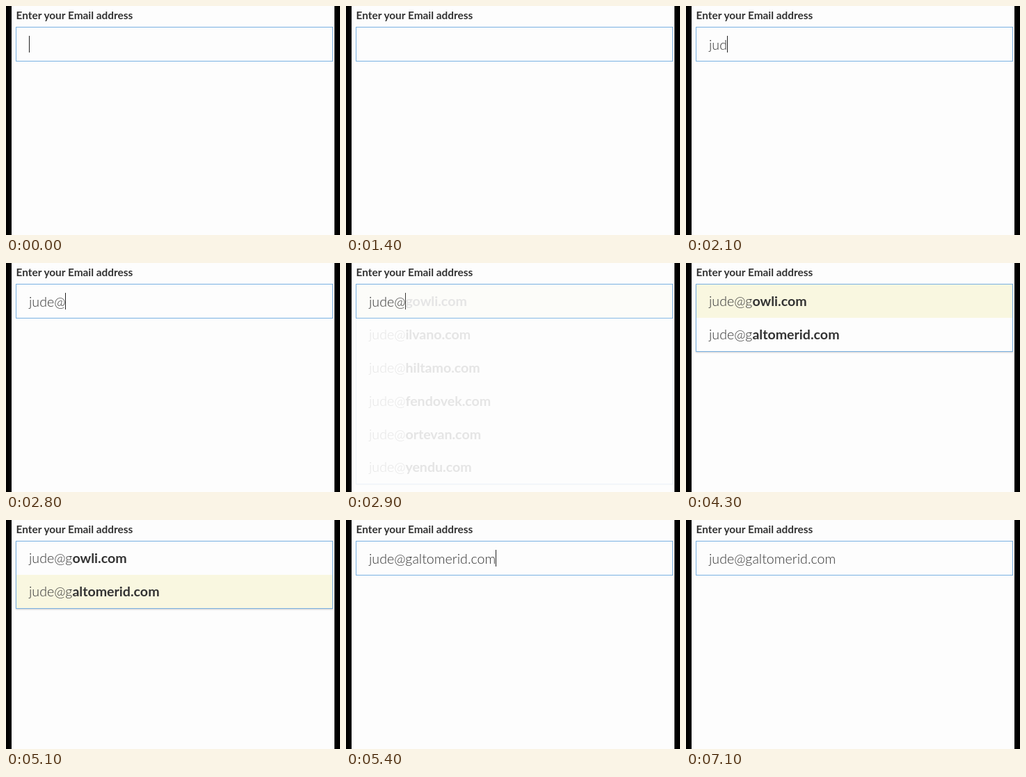
Recreate the animation shown at these times as an HTML page. Size 480 by 330 pixels, loop 7.2 s.

```html
<!DOCTYPE html>
<html lang="en">
<head>
<meta charset="utf-8">
<title>Email autocomplete</title>
<style>
  html, body { margin: 0; width: 100%; height: 100%; overflow: hidden; }
  body { background: #000; }
  #page {
    position: absolute; left: 8px; top: 0; width: 464px; height: 330px;
    background: #fdfdfd; color: #333; font: 300 19.6px Lato, sans-serif;
  }
  label { position: absolute; left: 6.5px; top: 0; font: 700 15.4px/27px Lato, sans-serif; }
  #field, .list {
    position: absolute; left: 6px; top: 30px; width: 456px;
    box-sizing: border-box; border: 1px solid #78b0e2; background: #fdfdfd;
  }
  #field { height: 50px; }
  .list { box-shadow: 0 1px 2px #0003; }
  .row { display: flex; align-items: center; height: 47.8px; padding-left: 18px; white-space: pre; }
  #field .row { height: 48px; }
  .row.active { background: #f9f7e0; }
  b { font-weight: 700; }
  #caret { width: 1px; height: 24px; background: #222; }
</style>
</head>
<body>
<div id="page">
  <label>Enter your Email address</label>
  <div id="field"><div class="row"><span id="typed"></span><i id="caret"></i></div></div>
</div>
<script>
const LOOP = 7200;
const user = 'jude@';
const domains = ['gowli', 'ilvano', 'hiltamo', 'fendovek', 'ortevan', 'yendu'];
const page = document.getElementById('page');
const typed = document.getElementById('typed');
const caret = document.getElementById('caret');

// Typed value from each time on
const typing = [
  [0, ''], [1700, 'j'], [1900, 'ju'], [2100, 'jud'], [2200, 'jude'],
  [2700, user], [3600, user + 'g'], [5200, user + 'galtomerid.com']
];
const caretOff = [[400, 900], [1400, 1700], [5800, 6300], [6800, LOOP]];

function makeList(prefix, names) {
  const list = document.createElement('div');
  list.className = 'list';
  for (const name of names) {
    const address = user + name + '.com';
    const row = document.createElement('div');
    row.className = 'row';
    row.innerHTML = `<span>${prefix}</span><b>${address.slice(prefix.length)}</b>`;
    list.append(row);
  }
  page.append(list);
  return list;
}

const filtered = makeList(user + 'g', ['gowli', 'galtomerid']);
const full = makeList(user, domains);
full.firstChild.classList.add('active');

const ramp = (t, from, to) => Math.min(1, Math.max(0, (t - from) / (to - from)));

function draw(now) {
  const t = now % LOOP;
  typed.textContent = typing.findLast(([start]) => t >= start)[1];
  const hidden = caretOff.some(([from, to]) => t >= from && t < to);
  caret.style.visibility = hidden ? 'hidden' : 'visible';

  full.style.opacity = ramp(t, 2850, 3300) * (1 - ramp(t, 3600, 4100));
  filtered.style.opacity = t < 3600 ? 0 : 1 - ramp(t, 5200, 5400);
  const selected = t < 5100 ? 0 : 1;
  [...filtered.children].forEach((row, i) => row.classList.toggle('active', i === selected));
  requestAnimationFrame(draw);
}
draw(0);
</script>
</body>
</html>
```
